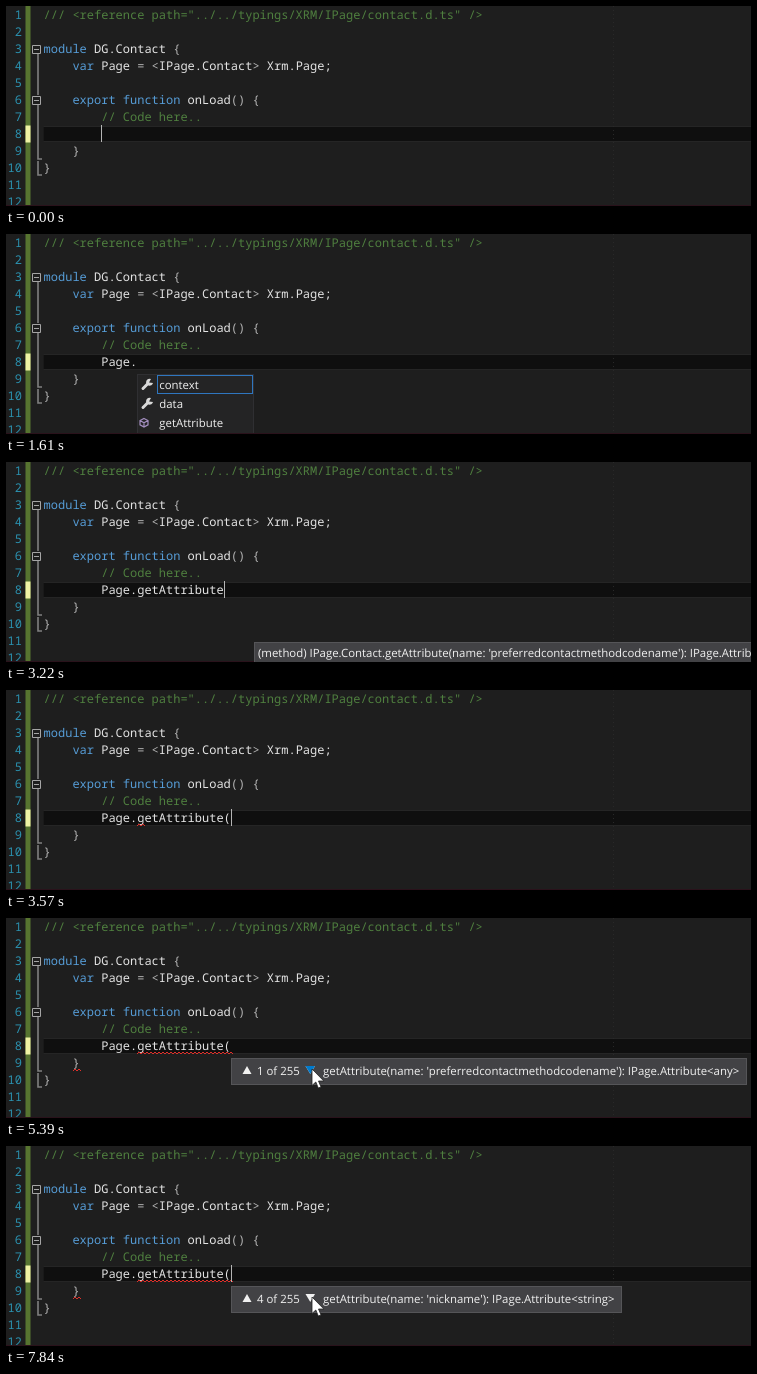
An HTML page for the animation above (8 s loop, 745x200 px).

```html
<!DOCTYPE html>
<html lang="en">
<head>
<meta charset="utf-8">
<title>Typed completion</title>
<style>
  html, body { margin: 0; width: 100%; height: 100%; overflow: hidden; background: #1e1e1e; }
  svg { display: block; }
  text { white-space: pre; text-rendering: geometricPrecision; }
  .code { font: 500 12px "Noto Sans Mono", monospace; fill: #e4e4e4; }
  .ui { font: 11.4px "Open Sans", sans-serif; fill: #f1f1f1; }
  .num { font-weight: 400; fill: #2b91af; text-anchor: end; }
  .k { fill: #569cd6; }
  .c { fill: #4f7f3f; }
  .o { fill: #b4b4b4; }
  .tip { fill: #424245; stroke: #555558; }
  .list { fill: #242425; stroke: #2f2f32; }
  .fold { fill: none; stroke: #a5a5a5; }
  .span { fill: none; stroke: #808080; stroke-width: 1.6; }
  .err { fill: none; stroke: #e0302a; }
</style>
</head>
<body>
<svg id="stage" width="745" height="200" viewBox="0 0 745 200"></svg>
<script>
const LOOP = 8000, STEP = 70, COL = 7.2, LEFT = 37.6, LINE = 17;
const stage = document.getElementById('stage');

const esc = s => s.replace(/&/g, '&amp;').replace(/</g, '&lt;');
const span = (cls, s) => `<tspan class="${cls}">${esc(s)}</tspan>`;
const ui = (x, y, s) => `<text class="ui" x="${x}" y="${y}">${esc(s)}</text>`;
const box = (cls, x, y, w, h) =>
  `<rect class="${cls}" x="${x + .5}" y="${y + .5}" width="${w - 1}" height="${h - 1}"/>`;
const fill = (color, x, y, w, h) =>
  `<rect fill="${color}" x="${x}" y="${y}" width="${w}" height="${h}"/>`;
// Visible during the given start/end pairs in ms
const during = (times, s) => `<g data-on="${times}">${s}</g>`;
const squiggle = (x, y, w) =>
  `<path class="err" d="M${x} ${y}${'l2 -2l2 2'.repeat(Math.round(w / 4))}"/>`;

const lines = [
  span('c', '/// <reference path="../../typings/XRM/IPage/contact.d.ts" />'),
  '',
  span('k', 'module') + ' DG.Contact ' + span('o', '{'),
  span('k', '    var') + ' Page ' + span('o', '= <') + 'IPage.Contact' + span('o', '>') + ' Xrm.Page;',
  '',
  span('k', '    export function') + ' onLoad' + span('o', '() {'),
  span('c', '        // Code here..'),
  '',
  span('o', '    }'),
  span('o', '}'),
  '', ''
];

const icons = {
  wrench: `<path d="M-4 4.500L1 -.5" stroke="#d8d8d8" stroke-width="3" stroke-linecap="round"/>
    <path d="M4 -5A3.500 3.500 0 1 0 6 -1L2 -1.600Z" fill="#d8d8d8"/>`,
  cube: `<path d="M-3 -3.500L1 -1.500V2.800L-3 5L-7 2.800V-1.500ZM-7 -1.500L-3 .7L1 -1.500M-3 .7V5"
    fill="none" stroke="#a48fc0" stroke-width="1.2"/>`,
  field: `<path d="M-7 -2L-1 -4L4 -1L-2 2ZM-7 -2V1.500L-2 5V2M-2 5L4 2.500V-1" fill="none" stroke="#6fb3e8"/>`
};

const pick = (x, w, row, solid) => solid
  ? fill('#3399ff', x + 20, 142 + 19 * row, w - 21, 19)
  : `<rect x="${x + 20.5}" y="${141.5 + 19 * row}" width="${w - 22}" height="18" fill="none" stroke="#2f76bf"/>`;

const list = (x, w, rows, picks) => box('list', x, 140, w, 80) + picks +
  rows.map(([icon, name], i) => {
    const y = 151 + 19 * i;
    return `<g transform="translate(${x + 10} ${y - 1})">${icons[icon]}</g>` + ui(x + 22.3, y + 4, name);
  }).join('');

const tip = (x, y, w, s) => box('tip', x, y, w, 21) + ui(x + 4, y + 15, s);

const signature = (n, w, name, type) => box('tip', 225, 140, w, 27) +
  '<path d="M236.500 156h9l-4.500-8z" fill="#f1f1f1"/><path d="M299.500 148h9.500l-4.750 8z" fill="#f1f1f1"/>' +
  ui(251, 157, `${n} of 255`) +
  ui(317, 157, `getAttribute(name: '${name}'): IPage.Attribute<${type}>`);

stage.innerHTML =
  fill('#1e1e1e', 0, 0, 745, 200) +
  fill('#252525', LEFT, 120, 708, 16) +
  fill('#0f0f0f', LEFT, 121, 708, 14) +
  '<path d="M607.500 0V200" stroke="#292929" stroke-dasharray="1 3"/>' +
  fill('#577430', 19.5, 0, 5, 200) +
  fill('#eff2a4', 19.5, 119.5, 5, 17) +
  lines.map((s, i) => `<text class="code num" x="16" y="${13 + LINE * i}">${i + 1}</text>
    <text class="code" x="${LEFT}" y="${13 + LINE * i}">${s}</text>`).join('') +
  '<path class="span" d="M32 48V89M32 99V153H36M32 155V169H36"/>' +
  [43, 94].map(y => `<path class="fold" d="M26.500 ${y - 3.5}h8v8h-8zM28 ${y + .5}h5"/>`).join('') +
  `<text id="typed" class="code" x="${LEFT + 8 * COL}" y="132"></text>` +
  during('3570 4690', squiggle(131, 136, 8)) +
  during('4690 8000', squiggle(131, 136, 94) + squiggle(67, 153, 8)) +
  '<rect id="caret" y="119" width="1" height="17" fill="#b4b4b4"/>' +
  during('840 1260', list(95, 179,
    [['field', 'opener'], ['cube', 'package'], ['field', 'Page']],
    during('840 980', pick(95, 179, 2, false)) + during('980 1260', pick(95, 179, 2, true)))) +
  during('1400 3220', list(131, 117,
    [['wrench', 'context'], ['wrench', 'data'], ['cube', 'getAttribute']],
    during('1400 2170', pick(131, 117, 0, false)) + during('2170 3220', pick(131, 117, 2, true)))) +
  fill('#2a121b', 0, 199, 745, 1) +
  during('840 1260', tip(274, 180, 119, 'Page: IPage.Contact')) +
  during('2030 2100', tip(248, 141, 269, '(property) IPage.Contact.context: IPage.Context')) +
  during('2940 3290', tip(248, 180, 600,
    "(method) IPage.Contact.getAttribute(name: 'preferredcontactmethodcodename'): IPage.Attribute<any>")) +
  during('3710 5530', signature(1, 516, 'preferredcontactmethodcodename', 'any')) +
  during('5530 6650', signature(2, 455, 'mastercontactidname', 'string')) +
  during('6650 7840', signature(3, 383, 'jobtitle', 'string')) +
  during('7840 8000', signature(4, 391, 'nickname', 'string')) +
  during('5390 5530 6510 6650 7770 7840', '<path d="M299.500 148h9.500l-4.750 8z" fill="#007acc"/>') +
  `<g id="mouse">
    <path id="beam" d="M-3 -6.500H-1L0 -5.500L1 -6.500H3M0 -5.500V5.500M-3 6.500H-1L0 5.500L1 6.500H3" fill="none" stroke="#050505"/>
    <path id="arrow" d="M0 0V16.500L3.800 13L6.300 19L9 17.900L6.500 12H11.800Z" fill="#fff" stroke="#222" stroke-width=".8"/>
  </g>`;

const [typed, caret, mouse, beam, arrow] =
  ['typed', 'caret', 'mouse', 'beam', 'arrow'].map(id => document.getElementById(id));
const timed = [...stage.querySelectorAll('[data-on]')].map(el => [el, el.dataset.on.split(' ').map(Number)]);

const keys = [[630, 1], [980, 2], [1120, 3], [1190, 4], [1260, 5], [2100, 6], [3220, 17], [3430, 18]];
const blink = [0, 210, 630, 1610, 2030, 2590, 3010, 3990, 4550, 4970, 5460, 5950, 6440, 6650, 7070, 7560, 7770, LOOP];

const inside = (times, t) => times.filter(x => x <= t).length % 2 === 1;
const show = (el, yes) => el.setAttribute('visibility', yes ? 'inherit' : 'hidden');

function draw(t) {
  for (const [el, times] of timed) show(el, inside(times, t));

  const count = keys.reduce((n, [at, len]) => t >= at ? len : n, 0);
  typed.textContent = 'Page.getAttribute('.slice(0, count);
  caret.setAttribute('x', Math.round(LEFT + (8 + count) * COL));
  show(caret, inside(blink, t));

  // The pointer rises in steps and becomes an arrow over the popup
  const p = Math.min(1, Math.max(0, Math.floor((t - 4480) / STEP) / 7));
  const y = 191 - 40 * p * (2 - p);
  mouse.setAttribute('transform', `translate(${305 + p} ${y})`);
  show(mouse, t >= 4480);
  show(beam, t >= 4480 && y > 167);
  show(arrow, t >= 4480 && y <= 167);
}

function tick() {
  draw(performance.now() % LOOP);
  requestAnimationFrame(tick);
}
tick();
</script>
</body>
</html>
```
